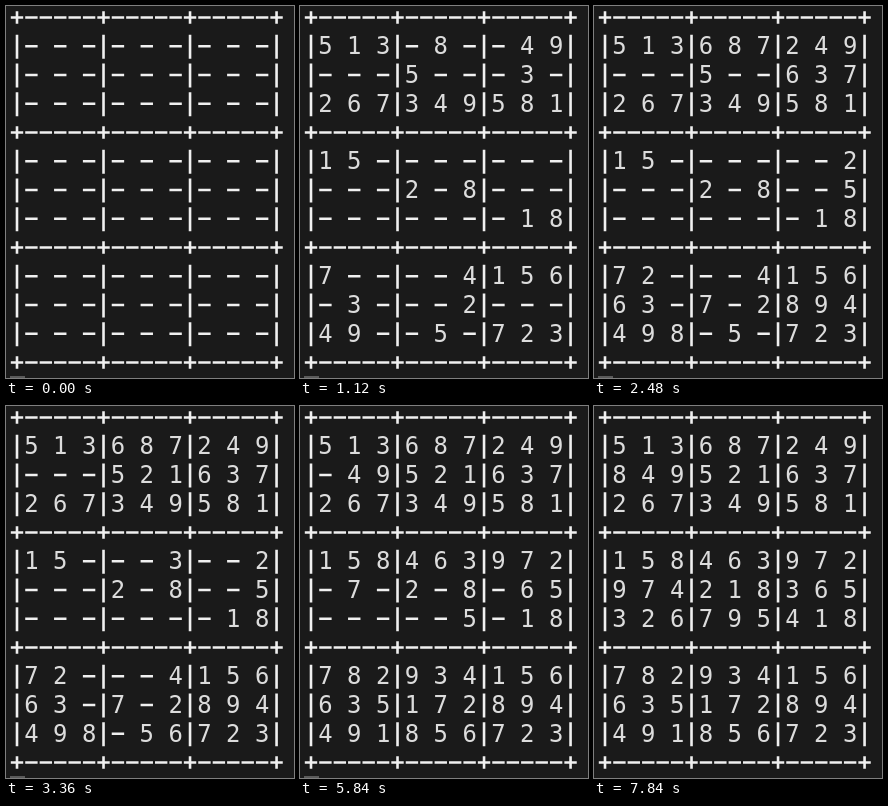
These frames come from a looping animation (288x372 px, 7.92 s). An HTML page:

```html
<!DOCTYPE html>
<html lang="en">
<head>
<meta charset="utf-8">
<title>Sudoku solver</title>
<style>
  html, body { margin: 0; width: 100%; height: 100%; overflow: hidden; background: #1a1a1a; }
  svg { display: block; width: 288px; height: 372px; }
  text { font: 23.9px "DejaVu Sans Mono", "Noto Sans Mono", monospace; fill: #dcdcdc; text-anchor: middle; }
  path { stroke: #f0f0f0; stroke-width: 2.6; fill: none; }
</style>
</head>
<body>
<svg viewBox="0 0 288 372"><path id="frame"/><path id="blanks"/><g id="digits"></g>
<rect id="cursor" x="4" y="370" width="15" height="2" fill="#5a5a5a"/></svg>
<script>
const TICK = 80, TICKS = 99, GIVEN_TICK = 2, SOLVED_TICK = 86;
const colX = i => 11 + 14.42 * i;
const lineY = i => 11.5 + 28.75 * i;
const dash = (x, y) => `M${x - 6.2} ${y}h12.4`;
const bar = (x, y, half) => `M${x} ${y - half}v${2 * half}`;
const byId = id => document.getElementById(id);

const givens = [
  '5...8..49', '...5...3.', '.673....1',
  '15.......', '...2.8...', '.......18',
  '7....415.', '.3...2...', '49..5...3'
].join('');

// Each move is row, column, digit; moves are spread evenly over a phase.
const phases = [
  [GIVEN_TICK, 14, '369 312 121 133 354 375 388 796 982 977'],
  [14, 31, '146 167 172 276 297 492 595 878 889 894 816 722 847 938'],
  [31, 42, '252 261 463 966'],
  [42, 55, '931 948 665 749 753 835 851'],
  [55, 73, '728 732 841 857 229 224 239 438 444 456 479 487 527 586'],
  [73, SOLVED_TICK, '218 519 534 551 573 613 622 636 647 659 674']
];
const moves = phases.flatMap(([start, end, list]) => {
  const entries = list.split(' ');
  return entries.map((entry, i) => {
    const [row, col, digit] = entry;
    const tick = Math.round(start + (i + 1) / entries.length * (end - start));
    return { tick, cell: (row - 1) * 9 + (col - 1), digit };
  });
});

const cells = Array.from({ length: 81 }, (_, i) => {
  const row = Math.floor(i / 9), col = i % 9;
  const x = colX(1 + 2 * col);
  const y = lineY(row + 1 + Math.floor(row / 3));
  const label = document.createElementNS('http://www.w3.org/2000/svg', 'text');
  label.setAttribute('x', x);
  label.setAttribute('y', y + 8.2);
  byId('digits').append(label);
  return { x, y, label };
});

let border = '';
for (let line = 0; line < 13; line++) {
  const y = lineY(line), rule = line % 4 === 0;
  for (let i = 0; i < 19; i++) {
    const x = colX(i), joint = i % 6 === 0;
    if (rule) border += dash(x, y) + (joint ? bar(x, y, 6.2) : '');
    else if (joint) border += bar(x, y + 0.5, 12);
  }
}
byId('frame').setAttribute('d', border);

function boardAt(tick) {
  const board = tick < GIVEN_TICK ? Array(81).fill('.') : [...givens];
  for (const move of moves) if (tick >= move.tick) board[move.cell] = move.digit;
  return board;
}

function render(time) {
  const tick = Math.floor(time / TICK) % TICKS;
  const board = boardAt(tick);
  let blanks = '';
  cells.forEach(({ x, y, label }, i) => {
    const empty = board[i] === '.';
    label.textContent = empty ? '' : board[i];
    if (empty) blanks += dash(x, y);
  });
  byId('blanks').setAttribute('d', blanks);
  byId('cursor').setAttribute('visibility', tick < SOLVED_TICK ? 'visible' : 'hidden');
}

const began = performance.now();
function loop() {
  render(performance.now() - began);
  requestAnimationFrame(loop);
}
loop();
</script>
</body>
</html>
```
